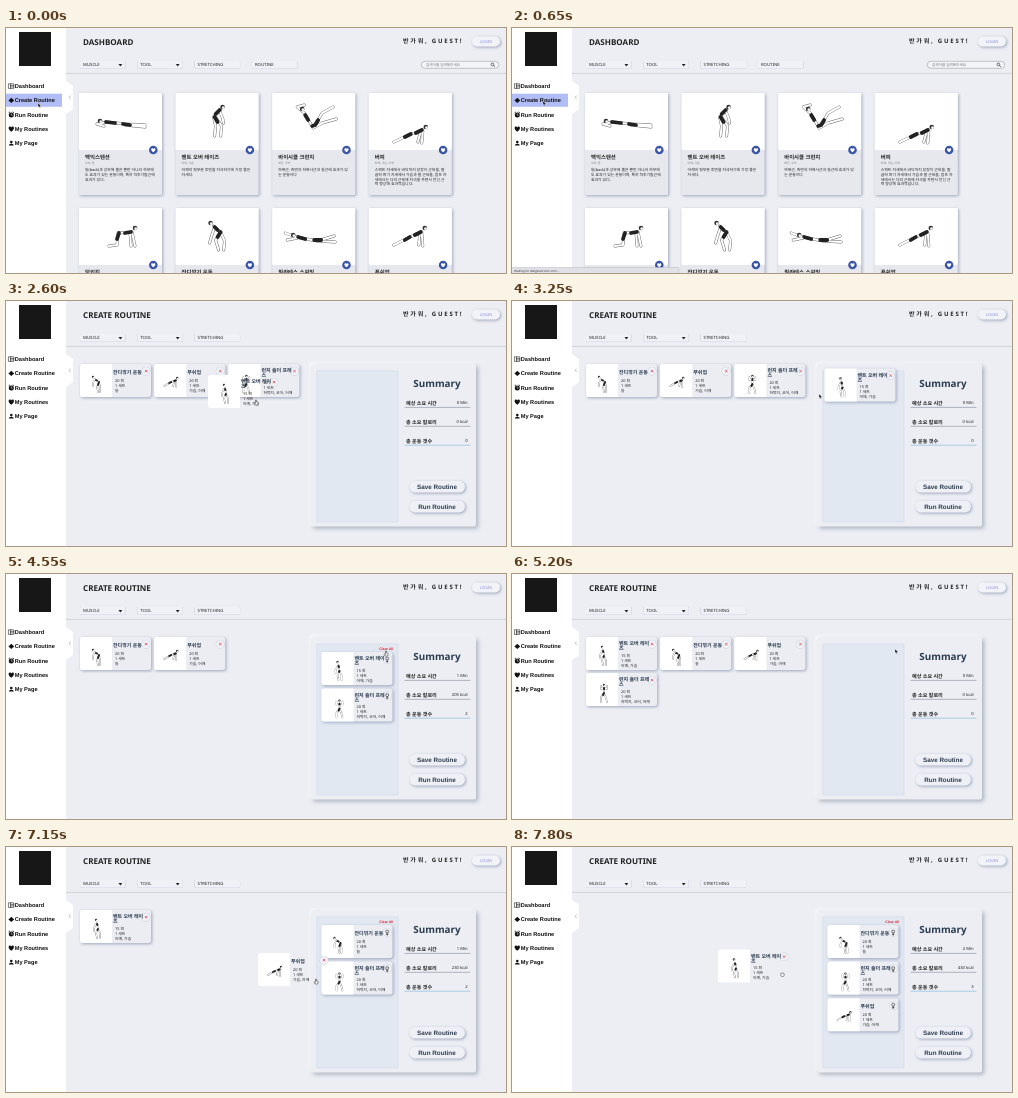
Recreate the animation shown at these times as an HTML page. Size 500 by 245 pixels, loop 8000 ms.

```html
<!DOCTYPE html>
<html lang="ko">
<head>
<meta charset="utf-8">
<title>Create Routine</title>
<style>
html, body { margin: 0; width: 100%; height: 100%; overflow: hidden; background: #eceef3; }
svg { display: block; width: 100vw; height: 100vh; text-rendering: geometricPrecision; }
text { font-family: "Noto Sans", "Noto Sans CJK KR", "Noto Sans CJK", sans-serif; fill: #222; }
.arial { font-family: "Liberation Sans", Arial, sans-serif; font-weight: 700; }
.b { font-weight: 700; }
.semi { font-weight: 600; }
.raised { filter: drop-shadow(1px 1.2px 1.4px rgba(95,105,140,.55)); }
.soft { filter: drop-shadow(.5px .7px .6px rgba(95,105,140,.55)); }
.panel { filter: drop-shadow(2px 2px 2px rgba(110,118,140,.55)) drop-shadow(-1px -1px 1.5px #fff); }
</style>
</head>
<body>
<svg id="stage" viewBox="0 0 500 245" preserveAspectRatio="none"></svg>
<script>
const STEP = 650, LOOP = 8000;
const stage = document.getElementById('stage');

// y is the middle of the line
const text = (x, y, size, str, cls = '', attrs = '') =>
  `<text x="${x}" y="${y + size * .36}" font-size="${size}" class="${cls}" ${attrs}>${str}</text>`;
const rect = (x, y, w, h, r, fill, attrs = '') =>
  `<rect x="${x}" y="${y}" width="${w}" height="${h}" rx="${r}" fill="${fill}" ${attrs}/>`;
const circle = (x, y, r, fill, attrs = '') =>
  `<circle cx="${x}" cy="${y}" r="${r}" fill="${fill}" ${attrs}/>`;
const path = (d, attrs) => `<path d="${d}" ${attrs}/>`;
const line = (d, color, w) =>
  path(d, `fill="none" stroke="${color}" stroke-width="${w}" stroke-linecap="round" stroke-linejoin="round"`);
const at = (x, y, body) => `<g transform="translate(${x} ${y})">${body}</g>`;
const heart = (x, y, s, fill) => at(x, y,
  path('M0 1 C-1.5 -.1 -1.1 -1 -.5 -1 Q-.1 -1 0 -.6 Q.1 -1 .5 -1 C1.1 -1 1.5 -.1 0 1Z',
    `transform="scale(${s})" fill="${fill}"`));

const figure = ([skin, dark, hx, hy], w) =>
  line(skin, '#666', w) + line(skin, '#fff', w * .7) + line(dark, '#222', w * 1.3) +
  circle(hx, hy, w * .8, '#333') + circle(hx + w * .25, hy + w * .25, w * .5, '#eee');

// Dashboard exercises: title, parts, description, pose
const EXERCISES = [
  ['백익스텐션', '코어, 등',
    ['등(back)과 상부에 줄은 뿐만 아니라 하부에', '도 효과가 있는 운동이며, 특히 척추기립근에', '효과가 있다.'],
    ['M25 33L18 31L28 29L46 31L66 32M46 32L66 34', 'M27 29L36 30M44 31L51 32', 21, 28]],
  ['벤트 오버 레이즈', '어깨, 가슴',
    ['어깨의 뒷부분 후면을 자극하기에 가장 좋은', '자세다.'],
    ['M45 17L38 24L40 33L39 43M40 24L46 33L45 43M44 18L47 25L48 30', 'M44 17L40 21M39 24L42 29', 47, 14]],
  ['바이시클 크런치', '복근, 코어',
    ['하복근, 측면의 하복사근과 등근에 효과가 있', '는 운동이다'],
    ['M32 20L41 35L50 20L61 14M41 35L50 30L64 26M32 20L25 14L32 12', 'M33 22L36 27M40 33L43 32L46 27', 30, 16]],
  ['버피', '하체, 가슴, 어깨',
    ['스쿼트 자세에서 바닥까지 당장이 근육을, 팔', '굽혀 펴기 자세에서 가슴과 팔 근육을, 점프 자',
      '세에서는 다리 근육에 자극을 주면서 전신 근', '력 향상에 효과적입니다.'],
    ['M54 37L40 42L25 49M54 38L53 50M52 38L49 49', 'M53 37L47 40M42 41L36 44', 57, 34]],
  ['덩키킥', '', [],
    ['M53 24L39 25L38 37L30 38M53 24L56 38M51 24L52 38', 'M52 24L46 25M40 25L38 31', 56, 20]],
  ['잔디깎기 운동', '', [],
    ['M38 18L45 24L40 32L43 42M45 24L49 33L48 42M39 19L36 28L34 35', 'M39 19L42 22M45 24L42 29', 35, 15]],
  ['필라테스 스위밍', '', [],
    ['M24 29L45 33L62 28M45 33L63 34M24 29L13 25M25 30L15 32', 'M26 29L33 31M42 32L49 32', 21, 27]],
  ['푸쉬업', '', [],
    ['M53 24L39 30L25 37M53 25L54 38M51 25L50 37', 'M52 24L46 27M41 29L36 32', 56, 20]]
];

// Routine cards: title lines, reps, parts, minutes, kcal, pose
const MOVES = {
  bent: { title: ['벤트 오버 레이', '즈'], reps: 15, parts: '어깨, 가슴', min: .5, kcal: 85,
    pose: ['M17 13L18 19L16 23L17 28M18 19L20 23L20 28M16 14L14 18L14 21', 'M17 14L17.5 15M18 19L17.5 20', 16, 10] },
  mow: { title: ['잔디깎기 운동'], reps: 20, parts: '등', min: .6, kcal: 110,
    pose: ['M15 15L19 18L17 23L18 28M19 18L20 23L20 28M15 15L13 19L13 22', 'M16 16L17 16.5M19 18L18 21', 13, 13] },
  push: { title: ['푸쉬업'], reps: 20, parts: '가슴, 어깨', min: .5, kcal: 200,
    pose: ['M22 16L17 18L10 22M22 17L22 23M20 17L19 22', 'M21.5 16.5L20 17M17 18L15 19', 23, 14] },
  lunge: { title: ['런지 숄더 프레', '스'], reps: 20, parts: '허벅지, 코어, 어깨', min: .6, kcal: 120,
    pose: ['M18 15L18 20L15 24L15 29M18 20L20 25L21 29M18 15L15 16L15 13M18 15L21 16L21 13', 'M18 15L18 16M18 20L17 22', 18, 12] }
};
const ALL = ['bent', 'mow', 'push', 'lunge'];

// One entry per step; drag = [card, x, y, style], cursor = [kind, x, y]
const SCENES = [
  { dash: 1, active: 1, cursor: ['arrow', 32, 75] },
  { dash: 1, active: 1, bar: 1, cursor: ['arrow', 31, 73] },
  { list: ALL, active: 1, bar: 1, cursor: ['arrow', 31, 73] },
  { list: ALL, cursor: ['hand', 122, 87] },
  { list: ['mow', 'push', 'lunge'], drag: ['bent', 202, 74, 'held'], cursor: ['hand', 250, 99] },
  { list: ['mow', 'push', 'lunge'], drag: ['bent', 312.5, 67.5], cursor: ['arrow', 307, 93] },
  { list: ['mow', 'push'], done: ['bent'], drag: ['lunge', 262, 88, 'held'], cursor: ['hand', 315, 117] },
  { list: ['mow', 'push'], done: ['bent', 'lunge'], cursor: ['hand', 380, 77] },
  { list: ALL, cursor: ['arrow', 383, 75] },
  { list: ['bent', 'push', 'lunge'], drag: ['mow', 240, 76, 'held'], cursor: ['hand', 293, 105] },
  { list: ['bent', 'push'], done: ['mow'], drag: ['lunge', 246, 87, 'held'], cursor: ['hand', 299, 115] },
  { list: ['bent'], done: ['mow', 'lunge'], drag: ['push', 252, 106, 'held'], cursor: ['hand', 310, 132] },
  { done: ['mow', 'lunge', 'push'], drag: ['bent', 206, 102.5, 'held'], cursor: ['grab', 270.5, 127.5] }
];

function sidebar(s) {
  const names = ['Dashboard', 'Create Routine', 'Run Routine', 'My Routines', 'My Page'];
  const icons = [
    line('M2.8 -2.3H7.8V2.3H2.8ZM4.5 -2.3V2.3M4.5 -.7H7.8M4.5 .8H7.8', '#222', .6),
    path('M5.3 -2.6L8.2 .2L5.3 2.5L2.4 .2Z', 'fill="#111"'),
    circle(5.3, .2, 2.5, '#111') + line('M3 -2.2L3.7 -2.6M7.6 -2.2L6.9 -2.6', '#111', .8) + line('M5.3 -1V.5H6.3', '#fff', .5),
    heart(5.3, .1, 2.6, '#111'),
    circle(5.3, -1.2, 1.3, '#111') + path('M2.8 2.3Q2.8 .4 5.3 .4Q7.8 .4 7.8 2.3Z', 'fill="#111"')
  ];
  return rect(0, 0, 60, 245, 0, '#fff') +
    path('M60 53L67 58V81L60 86Z', 'fill="#fff"') + line('M64.3 68L63.3 69.3L64.3 70.6', '#777', .5) +
    rect(13, 4, 32, 34, 0, '#171717') +
    (s.active ? rect(0, 65.7, 56, 13.1, 0, '#b0bdf6') : '') +
    names.map((n, i) => at(0, 58.1 + i * 14.3, icons[i]) +
      text(8.7, 58.1 + i * 14.3, 5.65, n, 'arial', 'style="fill:#111"')).join('');
}

function header(s) {
  const filters = ['MUSCLE', 'TOOL', 'STRETCHING'].concat(s.dash ? 'ROUTINE' : []);
  return text(77, 14, 8.05, s.dash ? 'DASHBOARD' : 'CREATE ROUTINE', 'semi') +
    text(397, 13, 6, '반가워, GUEST!', 'semi', 'letter-spacing="1.8"') +
    rect(466, 8.5, 28, 10, 5, '#f1f3f8', 'class="raised"') +
    text(480, 13.5, 4, 'LOGIN', '', 'text-anchor="middle" style="fill:#8d91dc"') +
    line('M60 45.4H500', '#c6c9d3', .7) +
    filters.map((f, i) => at(74 + i * 57.3, 33,
      rect(0, 0, 45.5, 7.8, 1, '#eff1f6', 'class="soft"') + text(3, 3.9, 4.3, f) +
      (i < 2 ? path('M38.5 2.9H42.3L40.4 5.4Z', 'fill="#222"') : ''))).join('') +
    (s.dash ? rect(415.3, 33.3, 77.5, 7, 3.5, '#f3f4f8', 'stroke="#8d9099" stroke-width=".5"') +
      text(420, 36.8, 3.6, '검색어를 입력해주세요', '', 'style="fill:#777"') +
      circle(486.4, 36.4, 1.4, 'none', 'stroke="#222" stroke-width=".6"') + line('M487.5 37.5L488.7 38.7', '#222', .6) : '');
}

function dashboard() {
  return EXERCISES.map(([title, parts, lines, pose], i) =>
    at(73 + i % 4 * 96.6, 65 + (i >> 2) * 115,
      rect(0, 0, 83, 102, 1, '#e6e8ee', 'class="raised"') + rect(0, 0, 83, 57, 1, '#fff') +
      figure(pose, 2.9) +
      circle(74.3, 57, 4.3, '#3a55a8') + heart(74.3, 57.2, 2, '#fff') +
      text(6, 64, 5.4, title, 'b') + text(6, 69.6, 2.9, parts, '', 'style="fill:#777"') +
      lines.map((l, n) => text(6, 76.7 + n * 4.75, 3.85, l)).join(''))).join('');
}

// style: listed, pinned, or held (no backing while in the hand)
function card(id, x, y, style = 'listed') {
  const m = MOVES[id], two = m.title.length > 1;
  const button = circle(66, 7.2, 4.3, '#eef0f5', 'class="soft"') + (style === 'pinned'
    ? circle(65.7, 6.5, 1.5, 'none', 'stroke="#222" stroke-width=".6"') + line('M65.7 8V10.3M64.8 9.4H66.6', '#222', .6)
    : line('M65.2 6.2L67 8M67 6.2L65.2 8', '#e03a45', .7));
  const details = [m.reps + ' 회', '1 세트', m.parts];
  return at(x, y,
    (style === 'held' ? '' : rect(0, 0, 71, 33, 2.5, '#ebedf3', 'class="raised"')) +
    path('M2.5 0H32V33H2.5Q0 33 0 30.5V2.5Q0 0 2.5 0Z', 'fill="#fff"') +
    figure(m.pose, 1.5) + button +
    m.title.map((t, i) => text(33, (two ? 6.3 : 8) + i * 5, 5, t, 'b', 'style="fill:#26364a"')).join('') +
    details.map((d, i) => text(35, (two ? 18.2 : 16.2) + i * 5, 3.85, d)).join(''));
}

function summary(done) {
  const sum = key => done.reduce((n, id) => n + MOVES[id][key], 0);
  const rows = [['예상 소요 시간', Math.round(sum('min')) + ' Min'],
    ['총 소요 칼로리', sum('kcal') + ' kcal'], ['총 운동 갯수', done.length]];
  const button = (y, label) => rect(403.5, y - 6, 55.5, 11.6, 5.8, '#eef0f6', 'class="raised"') +
    text(431, y, 6.3, label, 'arial', 'text-anchor="middle" style="fill:#2c3a4d"');
  return rect(305, 63, 165, 162.5, 2, '#eceef4', 'class="panel"') +
    rect(310.8, 69.8, 81.2, 151.2, 1, '#e2e8f2', 'stroke="#d0d8e6" stroke-width=".6"') +
    text(431, 82.7, 9.9, 'Summary', 'semi', 'text-anchor="middle" style="fill:#2b3d50"') +
    rows.map(([label, value], i) => text(400, 102.3 + i * 18.9, 5.1, label, 'semi') +
      text(461.7, 101.8 + i * 18.9, 4.2, value, '', 'text-anchor="end"') +
      line(`M399 ${106.4 + i * 18.9}H464`, i < 2 ? '#858994' : '#7fb4da', .6)).join('') +
    button(186, 'Save Routine') + button(205.8, 'Run Routine') +
    (done.length ? text(387.3, 75.2, 3.5, 'Clear All', 'arial', 'text-anchor="end" style="fill:#e0202c"') : '');
}

function routine({ list = [], done = [], drag }) {
  return list.map((id, i) => card(id, 74 + i % 3 * 74.2, 63 + Math.floor(i / 3) * 36)).join('') +
    summary(done) +
    done.map((id, i) => card(id, 315.5, 78 + i * 36.6, 'pinned')).join('') +
    (drag ? card(...drag) : '');
}

function cursor([kind, x, y]) {
  const shape = {
    arrow: 'M0 0V4.2L1 3.3L1.8 5L2.6 4.6L1.8 3H3.1Z',
    hand: 'M-.4 0H.4V1.8L2 2.2V4L1.4 5H-1L-2 3.2L-1.4 2.8L-.4 3.4Z',
    grab: 'M-1.6 -1Q0 -2 1.6 -1V.8L1 1.9H-1L-1.8 .4Z'
  }[kind];
  const arrow = kind === 'arrow';
  return at(x, y, path(shape, `fill="${arrow ? '#111' : '#fff'}" stroke="${arrow ? '#fff' : '#222'}" stroke-width="${arrow ? .35 : .5}"`));
}

function statusBar() {
  return rect(-1, 239.5, 168, 7, 1, '#dfe1e6', 'stroke="#b4b7be" stroke-width=".5"') +
    text(2, 242.5, 3.2, 'Waiting for dailyplanroom.com...', '',
      'style="font-family:\'Liberation Sans\',Arial,sans-serif;fill:#444"');
}

function draw(s) {
  stage.innerHTML = rect(0, 0, 500, 245, 0, '#eceef3') + sidebar(s) + header(s) +
    (s.dash ? dashboard() : routine(s)) + (s.bar ? statusBar() : '') + cursor(s.cursor);
}

let shown = -1;
function tick() {
  const step = Math.floor(performance.now() % LOOP / STEP);
  if (step !== shown) draw(SCENES[shown = step]);
  requestAnimationFrame(tick);
}
tick();
</script>
</body>
</html>
```
